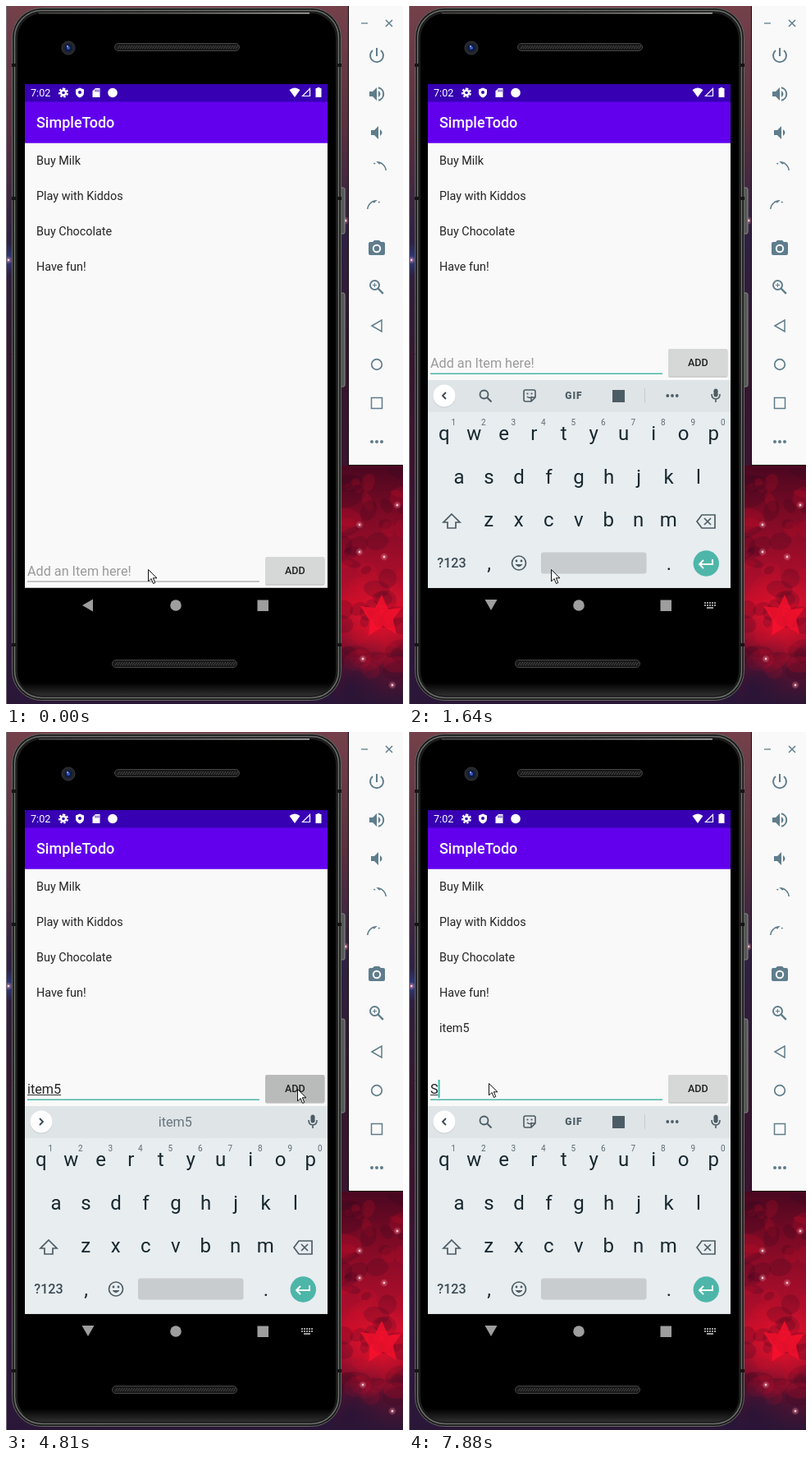
An HTML page with a canvas for the animation above (8000 ms loop, 484 by 849 pixels).

```html
<!DOCTYPE html>
<html lang="en">
<head>
<meta charset="utf-8">
<title>Todo list demo</title>
<style>
html, body { margin: 0; width: 484px; height: 849px; overflow: hidden; background: #000; }
canvas { display: block; }
</style>
</head>
<body>
<canvas id="stage" width="484" height="849"></canvas>
<script>
const LOOP = 8000, TEAL = '#4db6a9', SLATE = '#5f7d8c', KEY = '#17282f', KEY_ICON = '#4c5c64';
const KEYBOARD_SHIFT = 253, SCREEN_END = 707.7;
const stage = document.getElementById('stage').getContext('2d');
let c = stage;

// Drawing helpers
function box(x, y, w, h, fill, r = 0, stroke, lw = 1) {
  c.beginPath();
  c.roundRect(x, y, w, h, r);
  if (fill) { c.fillStyle = fill; c.fill(); }
  if (stroke) { c.strokeStyle = stroke; c.lineWidth = lw; c.stroke(); }
}
function dot(x, y, r, fill, stroke, lw = 2) {
  box(x - r, y - r, 2 * r, 2 * r, fill, r, stroke, lw);
}
function label(s, x, y, size, fill, align = 'left', weight = 400) {
  c.font = `${weight} ${size}px Roboto, sans-serif`;
  c.textAlign = align;
  c.fillStyle = fill;
  c.fillText(s, x, y);
}
function icon(x, y, d, fill, stroke, lw = 2, flip = 1) {
  const path = new Path2D(d);
  c.save();
  c.translate(x, y);
  c.scale(flip, 1);
  if (fill) { c.fillStyle = fill; c.fill(path); }
  if (stroke) { c.strokeStyle = stroke; c.lineWidth = lw; c.stroke(path); }
  c.restore();
}
function dots(x, y, gap, r, fill) {
  for (const i of [-1, 0, 1]) dot(x + i * gap, y, r, fill);
}
function gradient(x0, y0, x1, y1, ...colors) {
  const g = c.createLinearGradient(x0, y0, x1, y1);
  colors.forEach((col, i) => g.addColorStop(i / (colors.length - 1), col));
  return g;
}
function glow(x, y, r, rgb, alpha) {
  const g = c.createRadialGradient(x, y, 0, x, y, r);
  g.addColorStop(0, `rgba(${rgb},${alpha})`);
  g.addColorStop(1, `rgba(${rgb},0)`);
  c.fillStyle = g;
  c.fillRect(x - r, y - r, 2 * r, 2 * r);
}
// Latest entry [time, ...values] that has started
const at = (keys, t) => keys.findLast(k => k[0] <= t).slice(1);
const ramp = (t, a, b) => Math.min(1, Math.max(0, (t - a) / (b - a)));

// Static scenery
function drawSky() {
  box(0, 0, 484, 849, gradient(0, 0, 0, 849, '#74414a', '#5a303f', '#2f2142', '#33182f', '#3a1430', '#33173a', '#2a1738'));
  box(400, 559, 84, 290, gradient(0, 559, 0, 849, '#4a0720', '#7c0a25', '#a00d2a', '#b80f2d', '#6a0e2b', '#2c1636'));
  glow(456, 745, 60, '255,20,45', .75);
  let seed = 7;
  const rnd = () => (seed = seed * 16807 % 2147483647) / 2147483647;
  // Flat, hard-edged cloud patches
  for (let i = 0; i < 70; i++) {
    const rgb = rnd() < .5 ? '210,14,42' : '45,6,30';
    c.beginPath();
    c.ellipse(408 + rnd() * 80, 565 + rnd() * 245, 5 + rnd() * 14, 4 + rnd() * 9, -.6 + rnd(), 0, 7);
    c.fillStyle = `rgba(${rgb},.2)`;
    c.fill();
  }
  icon(456, 744, 'M-24-14L-6-12L2-28L10-10L26-12L16 2L20 20L4 10L-14 22L-12 4Z', 'rgba(255,16,44,.75)');
  glow(420, 830, 45, '38,20,55', .8);
  glow(3, 308, 20, '40,80,170', .6);
  for (const [x, y] of [[431, 631], [461, 670], [431, 664], [435, 794], [471, 826], [477, 607], [414, 261], [3, 309]]) {
    glow(x, y, 5, '255,150,170', .7);
    dot(x, y, 1.2, '#ffd5dc');
  }
  box(0, 0, 1, 849, '#77717a');
}

function drawPhone() {
  for (const [y, h] of [[221, 56], [349, 114]]) box(406, y, 7, h, '#555856', 2, '#888b88');
  box(7.5, 2.5, 401, 842, '#191a19', 36, '#666966');
  box(10.5, 5.5, 395, 836, '#1c1c1c', 33, '#6d706d', 1.5);
  box(14, 9, 388, 830, gradient(0, 808, 0, 838, '#000', '#000', '#2c2c2c'), 30);
  box(40, 8, 330, 1.5, gradient(40, 0, 370, 0, '#4a4c4a', '#6a6c6a', '#b5b7b4'));
  for (const y of [70, 232, 775]) {
    box(7, y, 5, 4, '#151515');
    box(404, y, 5, 4, '#151515');
  }
  for (const [x, y] of [[132, 45], [129, 795]]) {
    box(x + .5, y + .5, 152, 9, '#191919', 4.5, '#444');
    for (let i = 4; i < 150; i += 3) icon(x + i, y, 'M0 7L3 3', null, '#4b4b4b', 1);
  }
  dot(76, 51, 8, '#22252b', '#34373c', 1);
  dot(76, 51, 4.5, '#0d1a45');
  dot(76, 51, 2, '#365cc4');
  dot(75, 49, 1, '#a9bbec');
}

function drawPanel() {
  box(417, 0, 67, 559, '#15090f');
  box(418, 0, 66, 558, '#f9f9f9');
  const x = 452;
  const speaker = 'M-9-3H-5L0-8V8L-5 3H-9Z', wave = 'M2-4Q7 0 2 4Z';
  icon(437, 21, 'M-4 0H4', null, SLATE, 1.3);
  icon(467, 21, 'M-4-4L4 4M4-4L-4 4', null, SLATE, 1.5);
  icon(x, 60, 'M0-9V1M-5-6A8 8 0 1 0 5-6', null, SLATE, 2);
  icon(x, 107, speaker + wave, SLATE);
  icon(x, 107, 'M2-7.8A8 8 0 0 1 2 7.8', null, SLATE);
  icon(x + 2, 154, speaker + wave, SLATE);
  for (const [y, flip] of [[201, 1], [248, -1]]) {
    icon(x, y, 'M-3.5-9Q-2.8-9.6-2.1-9L9-2.1+4.9'.replace('-2.1+4.9', '2.1') + 'Q9.6 2.8 9 3.5L3.5 9Q2.8 9.6 2.1 9L-9-2.1Q-9.6-2.8-9-3.5Z', null, SLATE, 2, flip);
    icon(x, y, 'M4.5-9.5C7.8-8 10.1-4.8 10.5-1H12C11.4-7.2 6.3-12 0-12H-.7L3.2-8.2Z', SLATE, null, 0, flip);
  }
  icon(x, 294, 'M-8-7H-5L-3-9H3L5-7H8Q10-7 10-5V7Q10 9 8 9H-8Q-10 9-10 7V-5Q-10-7-8-7Z', SLATE);
  dot(x, 295, 4.2, SLATE, '#f9f9f9');
  dot(x - 2.5, 339.5, 5.5, null, SLATE);
  icon(x - 2.5, 339.5, 'M4 4L10.3 10.3', null, SLATE, 2.4);
  icon(x - 2.5, 339.5, 'M-2.5 0H2.5M0-2.5V2.5', null, SLATE, 1);
  icon(x, 389, 'M-6 0L6-7V7Z', null, SLATE, 1.5);
  dot(x, 436, 6.3, null, SLATE, 1.7);
  box(x - 6.5, 476.5, 13, 13, null, 0, SLATE, 1.5);
  dots(x, 530, 6, 2, SLATE);
}

function drawAppBars() {
  box(23, 95, 369, SCREEN_END - 95, '#f9f9f9');
  box(23, 95, 369, 71.8, '#6200ee');
  box(23, 95, 369, 21.5, '#3700b3');
  label('7:02', 30, 110, 12.6, '#fff');
  c.setLineDash([2.4, 1.8]);
  dot(70, 105.5, 5, null, '#fff', 2);
  c.setLineDash([]);
  dot(70, 105.5, 3, null, '#fff', 2.4);
  icon(90, 105.5, 'M0-6L5-4V0Q5 4 0 6Q-5 4-5 0V-4Z', '#fff');
  dot(90, 105, 2, '#3700b3');
  icon(110, 105.5, 'M-1-5.5H4.5V5.5H-4.5V-2Z', '#fff');
  icon(110, 105.5, 'M-1-4V-1M1-4V-1M3-4V-1', null, '#3700b3', .9);
  dot(130, 105.5, 5.8, '#fff');
  icon(352, 105, 'M0 6L-6.5-3Q0-8 6.5-3Z', '#fff');
  icon(366, 105, 'M-4.5 4.5H4.5V-4.5Z', null, '#fff', 1.2);
  icon(381, 105, 'M-1.5-6H1.5V-5H3.5V6H-3.5V-5H-1.5Z', '#fff');
  label('SimpleTodo', 37, 148, 18, '#fff', 'left', 500);
}

// Timeline: [time, value...]
const pointerKeys = [
  [0, 173, 685], [3730, 205, 668], [3850, 270, 598], [3970, 350, 515], [4090, 404, 447],
  [4370, 380, 438], [4520, 355, 434], [5810, 196, 397], [5930, 160, 383], [6080, 132, 388],
  [6220, 112, 404], [6360, 101, 419], [6500, 97, 427]
];
const typedKeys = [[0, ''], [1940, 'i'], [2220, 'ite'], [2690, 'item'], [2990, 'item5'], [4960, ''], [7880, 'S']];
const suggestionKeys = [
  [0], [1940, 'in', 'I', 'it'], [2220, 'items', 'ite', 'item'],
  [2690, 'Item', 'item', 'items'], [2990, '', 'item5', ''], [4960]
];
const caretKeys = [
  [0, 0], [160, 1], [730, 0], [1200, 1], [1640, 0], [1940, 1], [3430, 0], [3970, 1], [4370, 0],
  [4960, 1], [5390, 0], [5930, 1], [6360, 0], [6870, 1], [7300, 0], [7880, 1]
];
const keyboardKeys = [[0, 40, 0], [300, 18, .75], [430, 3, .95], [580, 0, 1]];

function drawField(t, raised) {
  const [text] = at(typedKeys, t);
  const focused = t >= 160;
  const pressed = t >= 4810 && t < 4960;
  c.save();
  c.translate(0, raised ? -KEYBOARD_SHIFT : 0);
  label(text || 'Add an Item here!', 26, 693, 16.2, text ? '#222' : '#9a9a9a');
  const width = text ? c.measureText(text).width : 0;
  if (text) box(26, 694, width, 1, '#333');
  box(26, 699.5, 283, focused ? 1.6 : 1, focused ? TEAL : '#929292');
  if (at(caretKeys, t)[0]) box(26 + width, 676, 2, 22, '#35bfb0');
  box(316, 671, 72.5, 33.8, '#c4c4c4', 2);
  box(316, 670, 72.5, 33.5, pressed ? '#b9baba' : '#d6d7d7', 2);
  label('ADD', 352.3, 691, 12.57, '#222', 'center', 500);
  c.restore();
}

function drawToolbar(words) {
  const y = 474;
  box(23, 455, 369, 39, '#dfe4e7');
  dot(43, y + 1, 13.7, '#cdd2d5');
  dot(43, y, 13.5, '#fff');
  icon(43, y, 'M2-4L-2 0L2 4', null, '#37474f', 1.8, words.length ? -1 : 1);
  icon(374, y, 'M0-6V-1', null, KEY_ICON, 5);
  icon(374, y, 'M-5-2Q-5 4 0 4Q5 4 5-2M0 4V8', null, KEY_ICON, 1.6);
  dot(374, y - 6, 2.5, KEY_ICON);
  dot(374, y - 1, 2.5, KEY_ICON);
  if (words.length) {
    words.forEach((w, i) => label(w, 108 + i * 98.3, 480, 16.2, '#66747b', 'center'));
    return;
  }
  dot(91.5, y - 1.5, 5, null, KEY_ICON, 1.8);
  icon(91.5, y - 1.5, 'M4 4L9 9', null, KEY_ICON);
  icon(147, y, 'M-5-7H5Q7-7 7-5V2L2 7H-5Q-7 7-7 5V-5Q-7-7-5-7ZM7 2H2V7M-3 1Q0 4 3 1', null, KEY_ICON, 1.6);
  dot(144.5, y - 2.5, 1.1, KEY_ICON);
  dot(149.5, y - 2.5, 1.1, KEY_ICON);
  c.letterSpacing = '1px';
  label('GIF', 201, y + 4, 12, KEY_ICON, 'center', 900);
  c.letterSpacing = '0px';
  box(248, y - 7, 15, 15, KEY_ICON);
  box(287, y - 9, 1, 18, '#c5ccd0');
  dots(321, y, 5.7, 1.9, KEY_ICON);
}

function drawKeyboard(t) {
  const [offset, alpha] = at(keyboardKeys, t);
  c.save();
  c.globalAlpha = alpha;
  c.translate(0, offset);
  box(23, 455, 369, SCREEN_END - 455, '#e8edf0');
  drawToolbar(at(suggestionKeys, t));
  [['qwertyuiop', 42.7, 528], ['asdfghjkl', 61, 581], ['zxcvbnm', 97.2, 633]].forEach(([row, x, y], r) => {
    [...row].forEach((ch, i) => {
      label(ch, x + i * 36.5, y, 24, KEY, 'center');
      if (r === 0) label((i + 1) % 10, x + 11.5 + i * 36.5, 510, 10, '#5d6b72', 'center');
    });
  });
  icon(52, 627, 'M0-9L10 1H5V8H-5V1H-10Z', null, KEY_ICON, 1.7);
  icon(362, 627, 'M-11 0L-5-8H11V8H-5ZM-2-4L6 4M6-4L-2 4', null, KEY_ICON, 1.7);
  label('?123', 52, 683, 16.2, '#3c4c54', 'center', 500);
  label(',', 97.5, 686, 24, KEY, 'center');
  label('.', 317, 686, 24, KEY, 'center');
  dot(134, 677.5, 8.5, null, KEY_ICON, 1.7);
  dot(131, 675, 1.4, KEY_ICON);
  dot(137, 675, 1.4, KEY_ICON);
  icon(134, 677.5, 'M-4.5 1.5Q0 8 4.5 1.5Z', KEY_ICON);
  box(161, 664.5, 128.5, 26, '#c8cccf', 3);
  dot(362.3, 678, 15.7, TEAL);
  icon(362, 678, 'M8-5V1H-7M-3-4L-8 1L-3 6', null, '#fff', 1.9);
  c.restore();
}

function drawNav(open) {
  const gray = '#9e9e9e';
  icon(100, 729, open ? 'M-7.5-7H7.5L0 6Z' : 'M-7 0L6-7.5V7.5Z', gray);
  dot(207, 729, 6.8, gray);
  box(306.5, 722.5, 13.5, 13.5, gray);
  if (!open) return;
  for (let i = 0; i < 10; i++) box(360 + i % 5 * 3, 725 + (i > 4) * 3, 2, 2, gray);
  box(363, 731, 8, 2, gray);
}

function drawToast(t) {
  c.globalAlpha = ramp(t, 5000, 5390) * (1 - ramp(t, 6800, 7450));
  box(141, 644, 132, 42, '#ececed', 21);
  label('Item was added', 162.5, 669, 12.57, '#2b2b2b');
  c.globalAlpha = 1;
}

const scenery = document.createElement('canvas');
scenery.width = 484;
scenery.height = 849;
c = scenery.getContext('2d');
[drawSky, drawPhone, drawPanel, drawAppBars].forEach(draw => draw());
c = stage;

function render(now) {
  const t = now % LOOP;
  const open = t >= 300;
  c.drawImage(scenery, 0, 0);
  const items = ['Buy Milk', 'Play with Kiddos', 'Buy Chocolate', 'Have fun!'];
  if (t >= 4960) items.push('item5');
  items.forEach((s, i) => label(s, 37, 193 + i * 43, 14.4, '#252525'));
  drawField(t, open);
  drawNav(open);
  if (open) drawKeyboard(t);
  drawToast(t);
  const [x, y] = at(pointerKeys, t);
  icon(x, y, 'M.5.5V15L4 11.5L6.5 17.5L8.8 16.5L6.3 10.8H11Z', '#fff', '#111', 1);
}

const start = performance.now();
function tick() {
  render(performance.now() - start);
  requestAnimationFrame(tick);
}
tick();
</script>
</body>
</html>
```
